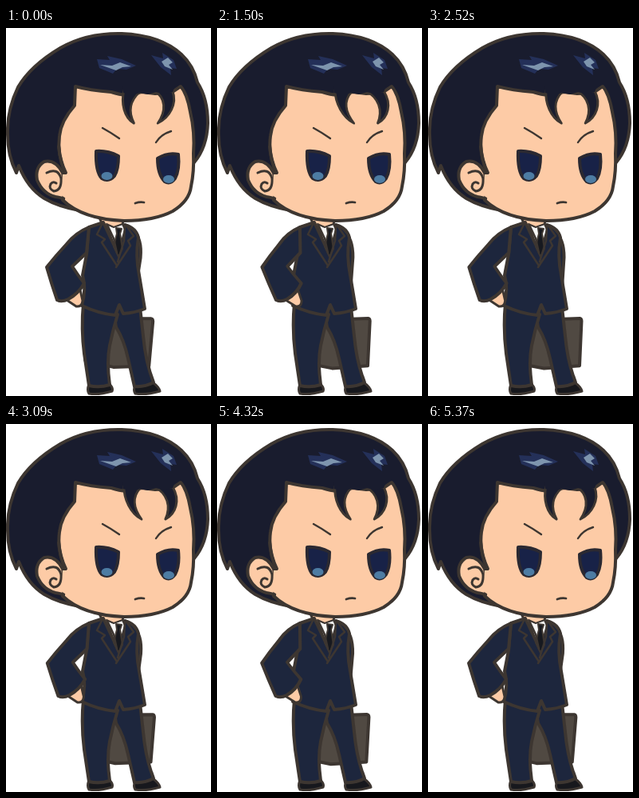
An HTML page for the animation above (5400 ms loop, 257 px wide and 460 px high).

```html
<!DOCTYPE html>
<html lang="en">
<head>
<meta charset="utf-8">
<title>Standing man with briefcase</title>
<style>
  html, body { margin: 0; width: 100%; height: 100%; overflow: hidden; background: #fff; }
  svg { display: block; width: 257px; height: 460px; }
  .line { fill: none; }
  .suit { fill: #1d263d; }
  .skin { fill: #fdcba6; }
  .hair { fill: #191c2e; }
  .shoe { fill: #17181d; }
  .flat { stroke: none; }
</style>
</head>
<body>
<svg viewBox="0 0 257 460" stroke="#3d3631" stroke-width="4" stroke-linejoin="round" stroke-linecap="round">
  <g id="swing">
    <g id="bag">
      <path fill="#504942" d="M133 368L169 365L210 359Q212 359 212.500 362L216 418L172 426L136 423Z"/>
      <path class="line" d="M169 363V355Q176 349 183 353L184 361"/>
    </g>
    <path class="skin" stroke-width="3" d="M168 346L183 345Q185 356 179 359Q170 362 167 356Z"/>
    <path class="suit" d="M157 256Q170 262 175 285L184 345Q179 351 168 351L155 295Z"/>
  </g>

  <g id="legs">
    <path class="shoe" stroke-width="3" d="M104 445Q101 453 104 457Q116 459 133 454Q135 450 129 444Z"/>
    <path class="shoe" stroke-width="3" d="M162 446Q159 453 162 457Q176 459 193 454Q192 449 184 443Z"/>
    <path class="suit" d="M134 350L138 374Q148 390 153 413L161 448Q174 449 185 443Q175 418 172 385L168 349Z"/>
    <path class="suit" d="M97 344Q94 376 98 407L104 447Q117 450 130 446Q126 417 130 397Q134 377 140 358Z"/>
  </g>

  <path class="skin" stroke-width="3" d="M116 235H148L143 264L124 252Z"/>
  <path class="suit" d="M104 249L122 243L139 279L149 246Q163 250 166 262Q162 285 167 309L174 351Q162 356 147 357L142 346L137 359Q116 357 95 347Q101 326 96 309L101 283Z"/>
  <path fill="#f7f7f6" stroke-width="2" d="M126 245L135 249L146 245L149 252L140 283Z"/>
  <path fill="#17191f" stroke-width="2" d="M138 250L145 251L143 257L146 276L141 286L135 273L139 257Z"/>
  <path class="line" stroke-width="2.500" d="M121 244L114 258L124 264L120 268L139 297M150 246L160 260L153 266L156 272L138 299M127 246L135 263L139 281M149 248L148 266L140 292"/>

  <g id="arm">
    <path class="skin" stroke-width="3" d="M79 333L92 323L96 341Q95 349 88 348L79 342L75 339Z"/>
    <path class="suit" d="M104 249Q87 256 76 270Q62 285 51 299Q57 320 64 340Q70 343 78 339Q91 332 98 319Q90 309 83 298L101 281Z"/>
  </g>

  <g id="head">
    <path class="hair" d="M92 228Q65 223 48 213Q27 200 16 172L13 181Q2 160 2 133Q1 103 15 74Q31 47 68 25Q101 6 145 7Q194 9 220 33Q235 47 240 68Q253 88 253 119Q252 149 236 168Z"/>
    <path class="skin" d="M87 73Q105 78 132 80Q152 87 170 80L187 82L207 81L219 73Q227 82 231 105Q237 130 235 157Q236 179 232 198Q230 216 209 229Q186 241 148 241Q96 239 71 215L74 181Q64 158 67 135Q69 116 86 97Z"/>
    <path class="skin" d="M71 181Q62 164 48 167Q36 174 39 190Q46 207 62 211Q70 212 72 214L74 197Z"/>
    <path class="skin flat" d="M71 183L77 183V214L69 209Z"/>
    <path class="line" d="M66 148Q68 167 75 181"/>
    <path class="line" stroke-width="3" d="M51 181Q65 174 69 188Q70 203 60 204Q53 201 56 195Q59 191 63 194"/>

    <g class="flat">
      <path fill="#243059" d="M114 39L130 40L127 35L145 39L163 47L151 52L139 51L134 57L117 50Z"/>
      <path fill="#243059" d="M182 34L197 38L196 31L210 40L214 51L206 50L207 59L194 49Z"/>
      <path fill="#7e95ae" d="M118 46L133 47L143 43L157 48L146 49L138 53Z"/>
      <path fill="#7e95ae" d="M195 42L203 37L209 43L204 46L209 52L199 48Z"/>
    </g>

    <g id="locks" class="hair" stroke-width="3">
      <path d="M148 78C146 94 153 112 166 119C157 105 157 91 168 80Z"/>
      <path d="M187 79C201 87 205 103 196 119C210 112 217 95 209 79Z"/>
    </g>
    <path class="hair flat" d="M146 72H212L209 80Q198 83 188 80L178 83L168 81Q158 85 147 81Z"/>

    <path class="line" stroke-width="2.400" d="M121 125Q132 131 142 138M207 129Q194 133 188 143"/>
    <g stroke="#2b2931" stroke-width="4">
      <path fill="#182247" d="M113 154Q127 153 141 160Q141 177 136 185Q129 193 120 188Q112 179 113 154Z"/>
      <path fill="#182247" d="M190 163Q203 155 216 158Q218 177 212 188Q206 196 199 192Q190 183 190 163Z"/>
      <ellipse class="flat" fill="#4d7ca3" cx="126.500" cy="185" rx="7" ry="5"/>
      <ellipse class="flat" fill="#4d7ca3" cx="204" cy="189" rx="7" ry="5"/>
    </g>
    <path class="line" stroke-width="2.800" d="M162 219Q168 217 173 218"/>
  </g>
</svg>
<script>
  const LOOP = 5400, STEP = 30, TURN = 2 * Math.PI;
  const part = id => document.getElementById(id);
  const move = (id, value) => part(id).setAttribute('transform', value);
  const skew = (id, y, angle) => move(id, `translate(0 ${y}) skewX(${angle}) translate(0 ${-y})`);
  const start = performance.now();

  function pose(time) {
    const phase = time / (LOOP / 2);
    const wave = (rate, peak) => Math.cos(TURN * rate * (phase - peak));

    // The body's slow sway carries a briefcase swinging twice as fast.
    const reach = 198.5 + 7.5 * wave(1, 0.47) + 12 * wave(2, 0.33);
    const angle = (218 - reach) * 0.52;
    move('swing', `rotate(${angle} 165 265)`);
    move('bag', `rotate(${-angle / 2} 176 352)`);

    skew('arm', 250, 3.2 * (1 - wave(1, 0.47 - 0.45)));

    // The forelocks sway three times for each sway of the body.
    skew('locks', 78, -9 * wave(3, 0.027));
  }

  function frame(now) {
    const time = Math.max(0, now - start) % LOOP;
    pose(Math.floor(time / STEP) * STEP);
    requestAnimationFrame(frame);
  }
  pose(0);
  requestAnimationFrame(frame);
</script>
</body>
</html>
```
